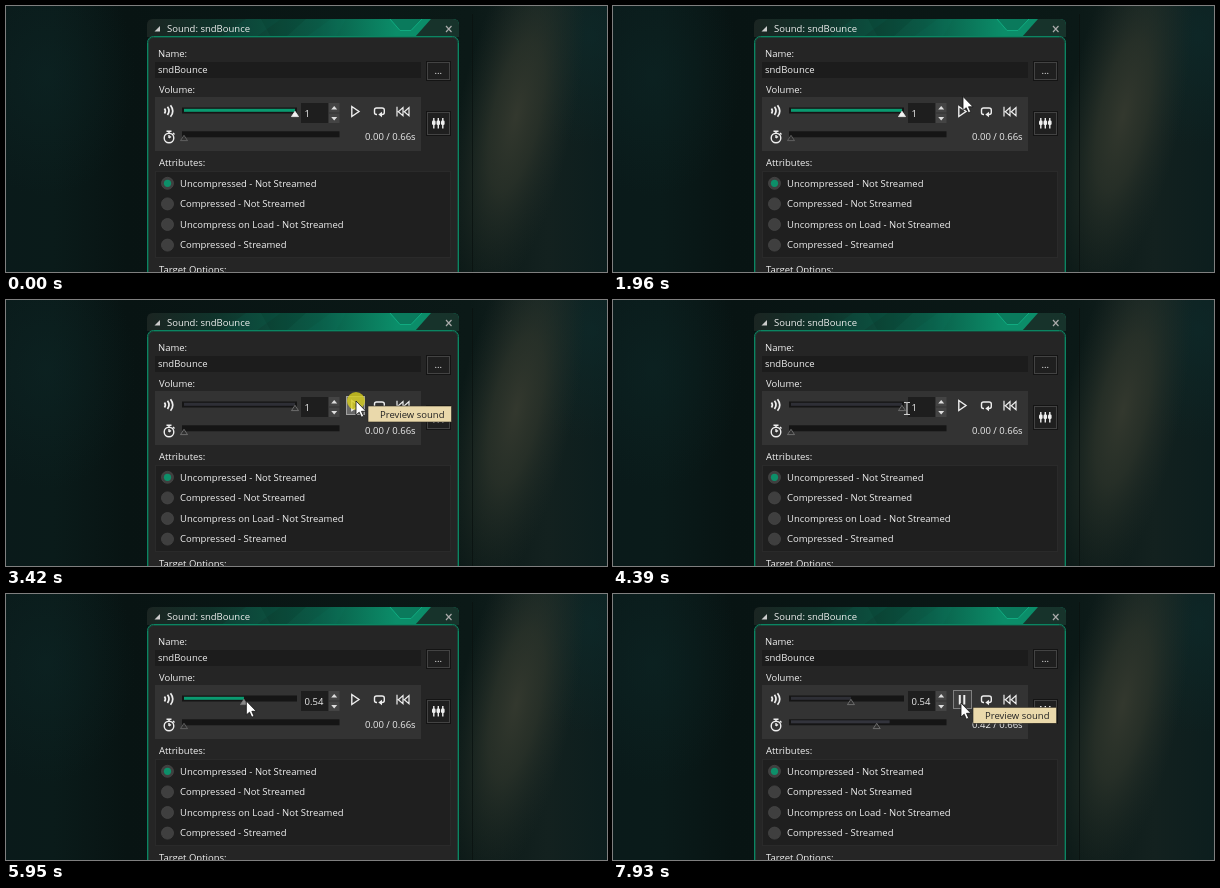
An HTML page for the animation above (8 s loop, 601 px wide and 266 px high).

```html
<!DOCTYPE html>
<html lang="en">
<head>
<meta charset="utf-8">
<title>Sound editor preview</title>
<style>
  html, body { margin: 0; width: 100%; height: 100%; overflow: hidden; background: #081412; }
  svg { display: block; width: 601px; height: 266px; }
  text { font: 9.5px "Open Sans", "Noto Sans", sans-serif; fill: #f0f0f0; }
  .line { fill: none; stroke: #eee; stroke-width: 1.4; }
  .well { fill: #1c1c1c; }
  .edge { fill: #141414; }
  .btn { fill: #1f1f1f; stroke: #434343; }
  .spin { fill: #444; }
</style>
</head>
<body>
<svg viewBox="0 0 601 266">
  <defs>
    <linearGradient id="base">
      <stop offset="0" stop-color="#0a1a1a"/>
      <stop offset=".08" stop-color="#0a1b1a"/>
      <stop offset=".2" stop-color="#081413"/>
      <stop offset=".77" stop-color="#0b1917"/>
      <stop offset=".9" stop-color="#13211f"/>
      <stop offset="1" stop-color="#0c1e1e"/>
    </linearGradient>
    <radialGradient id="olive">
      <stop offset="0" stop-color="#33382e"/>
      <stop offset=".4" stop-color="#2c332a" stop-opacity=".8"/>
      <stop offset="1" stop-color="#202b26" stop-opacity="0"/>
    </radialGradient>
    <radialGradient id="teal">
      <stop offset="0" stop-color="#0e2a2a"/>
      <stop offset="1" stop-color="#0e2a2a" stop-opacity="0"/>
    </radialGradient>
    <linearGradient id="bar">
      <stop offset="0" stop-color="#1b2522"/>
      <stop offset=".2" stop-color="#10322a"/>
      <stop offset=".55" stop-color="#0a5a46"/>
      <stop offset=".8" stop-color="#0b8d69"/>
      <stop offset="1" stop-color="#0b8d69"/>
    </linearGradient>
    <clipPath id="cap"><path d="M141 31V19q0-6 6-6H447q6 0 6 6V31Z"/></clipPath>
  </defs>

  <rect width="601" height="266" fill="url(#base)"/>
  <ellipse cx="40" cy="70" rx="90" ry="120" fill="url(#teal)" opacity=".4"/>
  <ellipse cx="585" cy="30" rx="90" ry="110" fill="url(#teal)" opacity=".7"/>
  <ellipse cx="510" cy="110" rx="58" ry="190" fill="url(#olive)" transform="rotate(12 510 110)"/>
  <path d="M466.5 8V266" stroke="#0a1210" opacity=".8"/>

  <g clip-path="url(#cap)">
    <rect x="141" y="13" width="312" height="18" fill="url(#bar)"/>
    <path d="M215 31L240 13H275L250 31ZM300 31L325 13H340L330 31Z" fill="#0d7d60" opacity=".12"/>
    <path d="M255 13H300L280 31H265Z" fill="#052a20" opacity=".15"/>
    <path d="M409 31L425 13H453V31Z" fill="#17332b"/>
    <path d="M384 13L394 24.500H405L416 13Z" fill="#0a7a5c"/>
    <path d="M384 13L394 24.500H405L416 13" fill="none" stroke="#10ab80"/>
  </g>
  <path d="M154 20V25.500H148.500Z" fill="#ccc"/>
  <path d="M440 20L445.500 26M445.500 20L440 26" class="line" style="stroke:#aaa;stroke-width:1.200"/>
  <text x="161" y="26">Sound: sndBounce</text>

  <rect x="141.500" y="30.500" width="311" height="250" rx="6" fill="#252525" stroke="#0b8562"/>
  <rect x="142.500" y="31.500" width="309" height="250" rx="5" fill="none" stroke="#135744" opacity=".7"/>
  <text x="152" y="51">Name:</text>
  <rect x="149" y="56" width="266" height="16" class="well"/>
  <text x="152" y="67">sndBounce</text>
  <rect x="420" y="55" width="25" height="20" class="edge"/>
  <rect x="421.500" y="56.500" width="22" height="17" class="btn"/>
  <text x="428.500" y="68">...</text>

  <text x="153" y="87">Volume:</text>
  <rect x="149" y="91" width="266" height="54" fill="#333"/>
  <path class="line" d="M158.500 102.500q1.800 2.500 0 5M161.500 100.800q3 4 0 8.200M164.500 99.200q4.600 6 0 11.500" style="stroke-width:1.700"/>
  <g class="line">
    <circle cx="163" cy="132" r="4.800"/>
    <path d="M160.500 125.200H165.500M163 125.500V127M163 132V129M163 132L165 130.500M167 127L168.500 128.500"/>
  </g>
  <g fill="#151515">
    <rect x="176" y="101.500" width="115" height="6"/>
    <rect x="176" y="125.300" width="157.500" height="6"/>
  </g>
  <rect id="volFill" x="178" y="102.800" height="3"/>
  <rect id="posFill" x="178" y="126.300" height="3" fill="#33343c"/>
  <path id="volThumb" d="M0 0L3.500 5.300H-3.500Z"/>
  <path id="posThumb" d="M0 0L3.500 5.300H-3.500Z"/>

  <rect x="295" y="97" width="27" height="20" fill="#1e1e1e"/>
  <text id="volText" x="298.500" y="110.500">1</text>
  <rect x="323" y="97" width="10.500" height="9.500" class="spin"/>
  <rect x="323" y="107.500" width="10.500" height="9.500" class="spin"/>
  <path d="M325.200 103.500L328.200 100L331.200 103.500ZM325.200 111H331.200L328.200 114.500Z" fill="#ddd"/>

  <rect id="button" x="340.500" y="96.500" width="18" height="18"/>
  <path id="play" class="line" d="M345.800 100.500V110.500L353 105.500Z"/>
  <path id="pause" class="line" d="M346.800 101V110.500M351.300 101V110.500" style="stroke-width:2"/>
  <path class="line" d="M371 108.500H370.500Q368.500 108.500 368.500 106.500V104Q368.500 102 370.500 102H376Q378.300 102 378.300 104V106.500Q378.300 108.500 376 108.500H374"/>
  <path d="M376 105.800V111.200L372.300 108.500Z" fill="#eee"/>
  <path class="line" d="M391 100.800V110.500M397 101.500V109.800L392.300 105.700ZM403 101.500V109.800L398.300 105.700Z" style="stroke-width:1.200"/>
  <text id="clock" x="359" y="134"></text>

  <rect x="420" y="105" width="25" height="25" class="edge"/>
  <rect x="421.500" y="106.500" width="22" height="22" class="btn"/>
  <g id="mixer" fill="#eee"></g>

  <text x="153" y="160">Attributes:</text>
  <rect x="149.500" y="165.500" width="295" height="86" fill="#1f1f1f" stroke="#2a2a2a"/>
  <g id="radios"></g>
  <text x="153" y="267">Target Options:</text>

  <g id="tip">
    <rect width="83.500" height="16" fill="#ead9ab" stroke="#2a2720" stroke-width=".6"/>
    <text x="12" y="11.600" style="fill:#222">Preview sound</text>
  </g>
  <circle id="press" r="9" fill="#d8cf1d" opacity=".8"/>
  <path id="arrow" d="M0 0V14L3.200 11.200L5.400 16.200L7.700 15.200L5.500 10.300H10Z" fill="#fff" stroke="#111" stroke-width=".8"/>
  <path id="beam" d="M-3 -6H-.8L0 -5.300L.8 -6H3M0 -5.300V5.300M-3 6H-.8L0 5.300L.8 6H3" fill="none" stroke="#d0d0d0" stroke-width="1.100"/>
</svg>

<script>
const LOOP = 8000, LENGTH = 0.66;
const CLICKS = [2370, 3420, 6550, 7660];
const DRAG = [4730, 5620];
// time, x, y of the pointer tip
const PATH = [
  [1390, 368, 258], [1600, 361, 165], [1800, 353, 108], [1960, 350, 90.5],
  [2090, 351, 89], [2160, 351, 92], [2230, 350, 101], [3850, 350, 101],
  [4000, 334, 102], [4190, 299, 107], [4390, 294, 108.5], [4530, 289, 107],
  [4800, 289, 107], [5550, 240, 107], [5950, 240, 107], [6120, 296, 104],
  [6290, 348, 109], [LOOP, 348, 109]
];

const el = {};
document.querySelectorAll("svg [id]").forEach(n => el[n.id] = n);
const set = (n, attrs) => { for (const k in attrs) n.setAttribute(k, attrs[k]); };
const show = (n, on) => n.style.display = on ? "" : "none";
const move = (n, x, y) => n.setAttribute("transform", `translate(${x} ${y})`);
const within = (t, a, b) => t >= a && t < b;

el.radios.innerHTML = [
  "Uncompressed - Not Streamed", "Compressed - Not Streamed",
  "Uncompress on Load - Not Streamed", "Compressed - Streamed"
].map((label, i) => {
  const y = 177.3 + i * 20.6;
  return `<circle cx="161.5" cy="${y}" r="6" fill="#3f3f3f" stroke="#474747" stroke-width=".8"/>` +
    (i ? "" : `<circle cx="161.5" cy="${y}" r="3.6" fill="#0d8f69"/>`) +
    `<text x="174" y="${y + 3.3}">${label}</text>`;
}).join("");

el.mixer.innerHTML = [427.8, 432.3, 436.8].map(x =>
  `<rect x="${x - 0.7}" y="112" width="1.4" height="10.5"/>` +
  `<rect x="${x - 1.8}" y="114.5" width="3.6" height="4.5" rx="1.2"/>`).join("");

function pointer(t) {
  let i = 1;
  while (i < PATH.length - 1 && PATH[i][0] <= t) i++;
  const [t0, x0, y0] = PATH[i - 1], [t1, x1, y1] = PATH[i];
  let k = Math.min(1, Math.max(0, (t - t0) / (t1 - t0)));
  if (within(t, 4800, 5550)) k = k * k * (3 - 2 * k);
  return [x0 + (x1 - x0) * k, y0 + (y1 - y0) * k];
}

// Seconds played since the last click; null when stopped
function played(t) {
  const start = CLICKS.find(c => within(t, c, c + 700));
  if (start === undefined) return null;
  const step = Math.floor((t - start) * 15 / 1000);
  return step ? Math.min(LENGTH, 0.14 + 0.07 * step) : null;
}

function volume(t) {
  if (t < DRAG[0]) return 1;
  return 1 - (289 - pointer(Math.min(t, DRAG[1]))[0]) / 49 * 0.46;
}

function draw(t) {
  const [x, y] = pointer(t);
  const visible = t >= PATH[0][0];
  const hover = visible && within(x, 340, 359) && within(y, 96.5, 116);
  const overText = visible && within(x, 292.5, 322) && within(y, 97, 117);
  const clicked = CLICKS.some(c => within(t, c, c + 125));
  const dragging = within(t, ...DRAG);
  const focus = t < CLICKS[0] || within(t, DRAG[0], CLICKS[2]);
  const hot = t < CLICKS[0] || within(t, 4530, 5950);

  const vol = volume(t), vx = 178 + 111 * vol;
  set(el.volFill, { width: vx - 178, fill: focus ? "#0a9a70" : "#2e2f36" });
  set(el.volThumb, {
    fill: hot ? "#f2f2f2" : focus ? "#888" : "#303030",
    stroke: hot ? "#f2f2f2" : "#7c7c7c", "stroke-width": 0.8
  });
  move(el.volThumb, vx, 105.3);
  el.volText.textContent = String(+vol.toFixed(2));

  const p = played(t), sec = p || 0;
  el.clock.textContent = `${sec.toFixed(2)} / ${LENGTH}s`;
  set(el.posFill, { width: sec / LENGTH * 155 });
  set(el.posThumb, { fill: "#303030", stroke: focus ? "#6a6a6a" : "#7c7c7c", "stroke-width": 0.8 });
  move(el.posThumb, 178 + Math.max(0, sec - 0.055) / LENGTH * 155, 129.3);

  show(el.button, hover);
  set(el.button, { fill: clicked ? "#686868" : "#3d3d3d", stroke: clicked ? "#a0a0a0" : "#808080" });
  show(el.play, p === null);
  show(el.pause, p !== null);

  show(el.tip, hover && (within(t, 2370, 4000) || t >= 6620));
  if (t < 5000) move(el.tip, 362, 106); else move(el.tip, 360, 113.3);
  show(el.press, clicked || dragging);
  move(el.press, x, y);
  show(el.arrow, visible && (!overText || dragging));
  show(el.beam, overText && !dragging);
  move(el.arrow, x, y);
  move(el.beam, x, y);
}

const origin = performance.now();
function tick() {
  draw((performance.now() - origin) % LOOP);
  requestAnimationFrame(tick);
}
draw(0);
requestAnimationFrame(tick);
</script>
</body>
</html>
```
